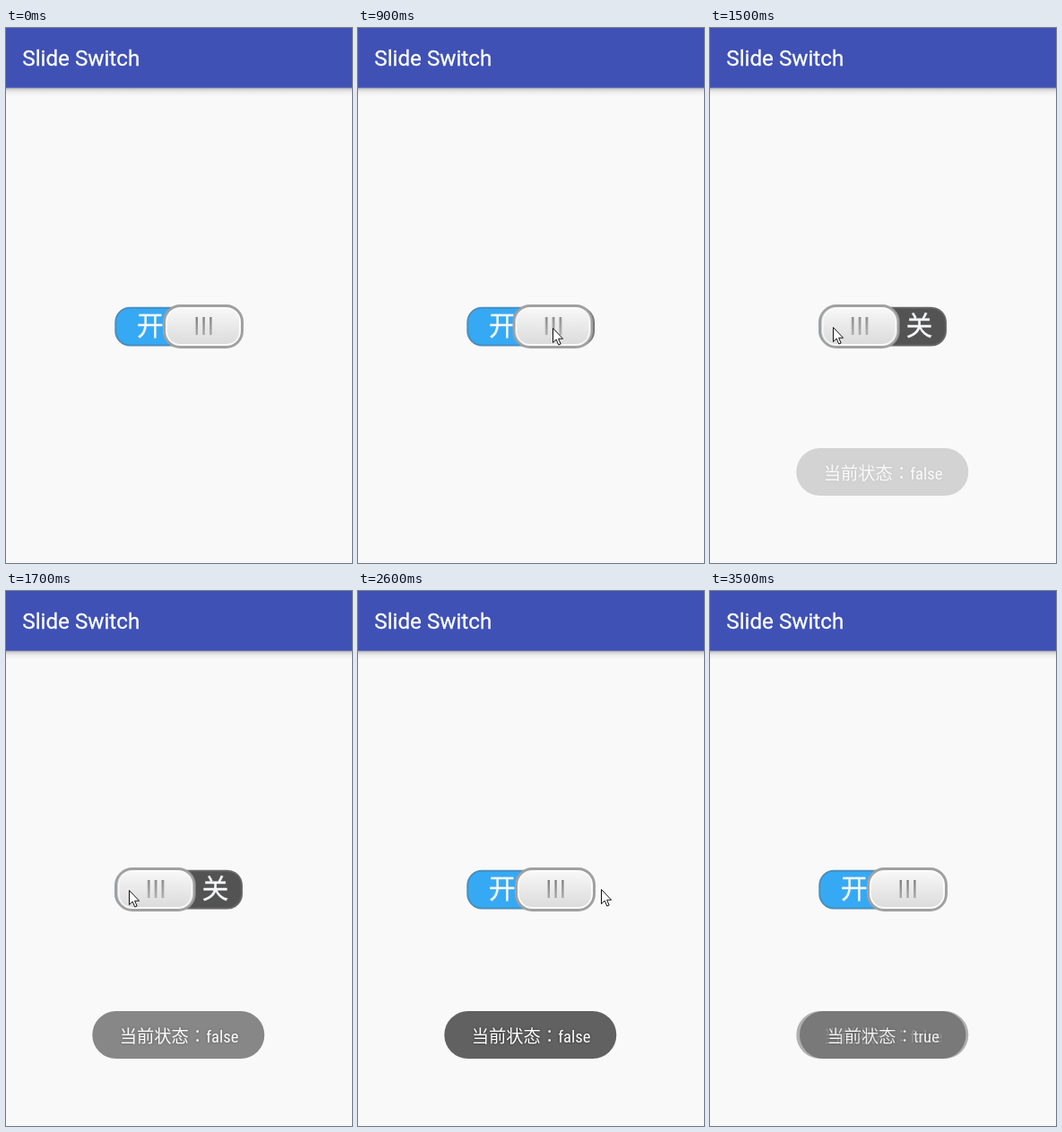
These frames come from a looping animation (386x596 px, 3600 ms). An HTML page:

```html
<!DOCTYPE html>
<html lang="zh-CN">
<head>
<meta charset="utf-8">
<title>Slide Switch</title>
<style>
  html, body { margin: 0; width: 100%; height: 100%; overflow: hidden; background: #f9f9f9; }
  svg { display: block; width: 386px; height: 596px; }
  .title { font: 24.2px Roboto, sans-serif; fill: #fff; stroke: #fff; stroke-width: .3px; }
  .label {
    font: 30px "Noto Sans CJK SC", "Noto Sans CJK", sans-serif; text-anchor: middle;
    fill: #f4f8fa; stroke: #f4f8fa; stroke-width: .3px;
  }
  .toast text {
    font: 19.3px "Noto Sans CJK SC", "Noto Sans CJK", sans-serif;
    fill: #fff; text-anchor: middle; text-shadow: 0 0 2.75px rgba(0, 0, 0, .6);
  }
  .toast .colon { font-family: "Noto Sans CJK TC", "Noto Sans CJK", sans-serif; }
  .toast .latin { font-family: "Roboto Condensed", Roboto, sans-serif; font-size: 18.7px; font-stretch: 75%; }
  .toast rect { fill: #616161; }

  .knob, .cursor, .toast { animation: 3600ms step-end infinite; }
  .knob { animation-name: slide; }
  .cursor { animation-name: point; }
  .off { animation-name: show-off; }
  .on { animation-name: show-on; }

  /* One 100 ms tick is 2.777% */
  @keyframes slide {
    0%, 72.22%, 100% { transform: translateX(175px); }
    24.99% { transform: translateX(172.5px); }
    27.77% { transform: translateX(156px); }
    30.55% { transform: translateX(136px); }
    33.33%, 36.11% { transform: translateX(121.5px); }
    66.66% { transform: translateX(133px); }
    69.44% { transform: translateX(175px); }
  }
  @keyframes point {
    0%, 86.11%, 100% { transform: translate(400px, 100px); }
    2.77% { transform: translate(291px, 232px); }
    5.55% { transform: translate(276px, 262px); }
    8.33% { transform: translate(257px, 291px); }
    11.11% { transform: translate(238px, 315px); }
    13.88% { transform: translate(224px, 330px); }
    16.66%, 24.99% { transform: translate(217px, 334px); }
    27.77% { transform: translate(201px, 334px); }
    30.55% { transform: translate(181px, 334px); }
    33.33% { transform: translate(157px, 333px); }
    36.11%, 47.22% { transform: translate(137px, 333px); }
    49.99% { transform: translate(146px, 332px); }
    52.77% { transform: translate(154px, 331px); }
    66.66% { transform: translate(178px, 331px); }
    69.44% { transform: translate(228px, 332px); }
    72.22% { transform: translate(271px, 332px); }
    74.99% { transform: translate(287px, 303px); }
    77.77% { transform: translate(318px, 250px); }
    80.55% { transform: translate(347px, 194px); }
    83.33% { transform: translate(374px, 130px); }
  }
  @keyframes show-off {
    0%, 100% { opacity: 0; }
    41.66% { opacity: .25; }
    44.44% { opacity: .5; }
    47.22% { opacity: .75; }
    49.99% { opacity: .94; }
    52.77% { opacity: 1; }
    91.66% { opacity: .88; }
    94.44% { opacity: .68; }
    97.22% { opacity: .48; }
  }
  @keyframes show-on {
    0%, 100% { opacity: 0; }
    91.66% { opacity: .2; }
    94.44% { opacity: .45; }
    97.22% { opacity: .69; }
  }
</style>
</head>
<body>
<svg viewBox="0 0 386 596">
  <defs>
    <linearGradient id="shade" x2="0" y2="1">
      <stop stop-color="#8d8f9c"/>
      <stop offset=".2" stop-color="#cbcbcd"/>
      <stop offset=".5" stop-color="#ebebeb"/>
      <stop offset="1" stop-color="#f9f9f9"/>
    </linearGradient>
    <linearGradient id="face" x2="0" y2="1">
      <stop stop-color="#f7f7f7"/>
      <stop offset=".5" stop-color="#e9e9e9"/>
      <stop offset="1" stop-color="#dcdcdc"/>
    </linearGradient>
    <linearGradient id="grip" x2="0" y2="1">
      <stop stop-color="#808080"/>
      <stop offset="1" stop-color="#aaa"/>
    </linearGradient>
    <clipPath id="left"><path d="M115 300h78v65h-78z"/></clipPath>
    <clipPath id="right"><path d="M193 300h78v65h-78z"/></clipPath>
  </defs>

  <rect width="386" height="596" fill="#f9f9f9"/>
  <rect y="66" width="386" height="10" fill="url(#shade)"/>
  <rect width="386" height="66.5" fill="#3f51b5"/>
  <text class="title" x="18.3" y="41.5">Slide Switch</text>

  <g stroke-width="2">
    <rect x="122.3" y="311.7" width="140.7" height="41.8" rx="16" fill="#36a9f5" stroke="#4a8fbd" clip-path="url(#left)"/>
    <rect x="122.3" y="311.7" width="140.7" height="41.8" rx="16" fill="#535353" stroke="#666" clip-path="url(#right)"/>
  </g>
  <text class="label" x="160.7" y="342.3">开</text>
  <text class="label" x="233.5" y="342.3">关</text>

  <g class="knob">
    <rect x="1.5" y="309.5" width="87" height="46" rx="18" fill="#fbfbfb" stroke="#a0a0a0" stroke-width="3"/>
    <rect x="5" y="313" width="80" height="39" rx="14" fill="url(#face)"/>
    <g fill="url(#grip)">
      <rect x="36.6" y="322" width="2.4" height="20"/>
      <rect x="44.4" y="322" width="2.4" height="20"/>
      <rect x="52.2" y="322" width="2.4" height="20"/>
    </g>
  </g>

  <g class="toast off">
    <rect x="96.3" y="468" width="192" height="53" rx="26.5"/>
    <text x="193.2" y="503">当前状态<tspan class="colon" lang="zh-TW">：</tspan><tspan class="latin">false</tspan></text>
  </g>
  <g class="toast on">
    <rect x="100" y="468" width="185.5" height="53" rx="26.5"/>
    <text x="193.2" y="503">当前状态<tspan class="colon" lang="zh-TW">：</tspan><tspan class="latin">true</tspan></text>
  </g>

  <path class="cursor" d="M.5.5v16l3.7-3.5 2.6 6 2.4-1-2.6-5.8h5z" fill="#fff" stroke="#111"/>
</svg>
</body>
</html>
```
